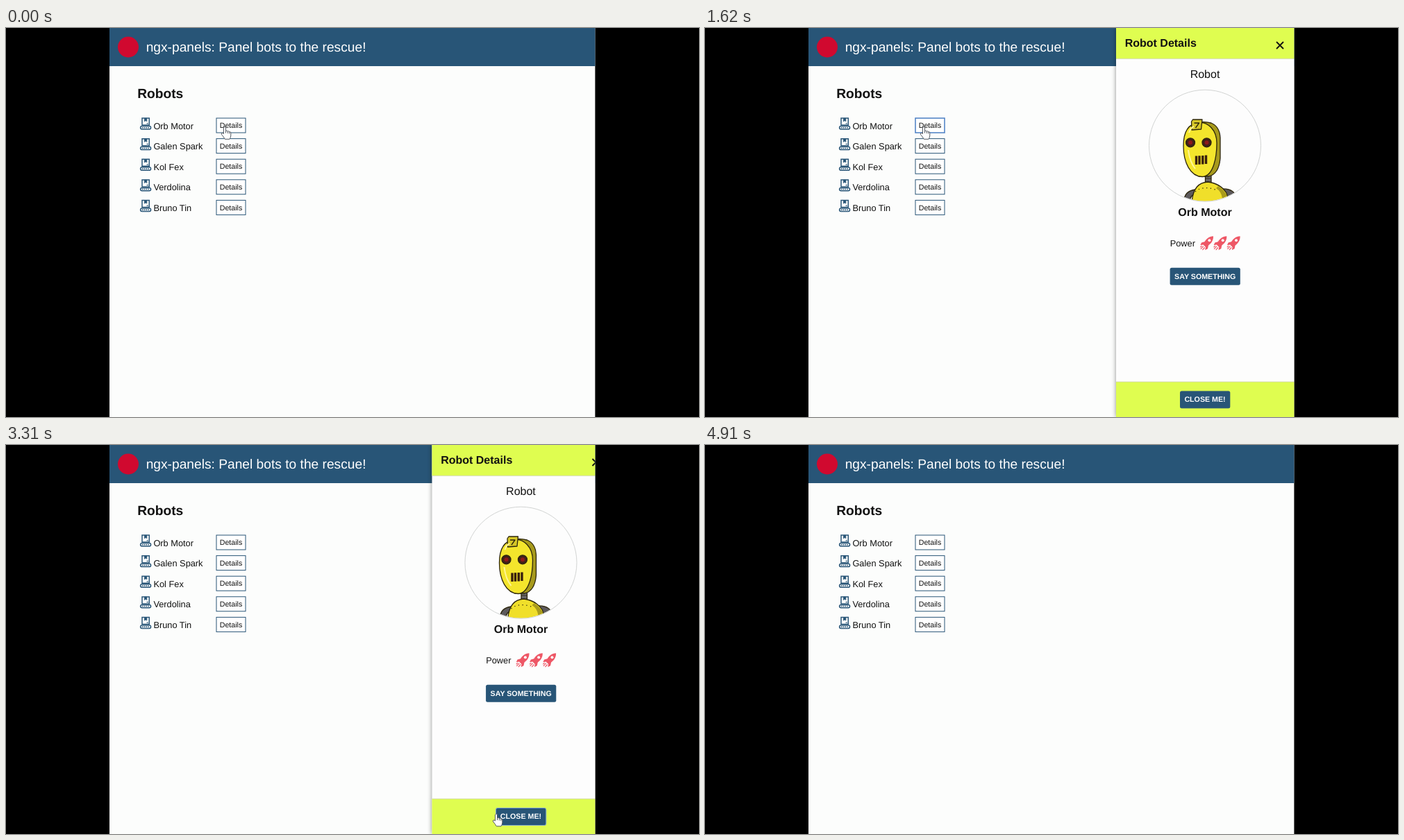
Recreate the animation shown at these times as an HTML page. Size 998 by 561 pixels, loop 4.98 s.

```html
<!DOCTYPE html>
<html lang="en">
<head>
<meta charset="utf-8">
<title>Robot panels</title>
<style>
  html, body { margin: 0; height: 100%; overflow: hidden; background: #000; }
  svg { display: block; width: 998px; height: 561px; }
  text { font-family: "Liberation Sans", Arial, sans-serif; fill: #111; text-rendering: geometricPrecision; }
  .bold { font-weight: bold; }
  #panel { filter: drop-shadow(0 0 3px rgba(0, 0, 0, .45)); }
</style>
</head>
<body>
<svg viewBox="0 0 998 561">
  <defs>
    <clipPath id="page"><rect x="149" width="699.4" height="561"/></clipPath>
    <clipPath id="round"><circle cx="720" cy="169.7" r="80"/></clipPath>
    <g id="icon" fill="none" stroke="#285577" stroke-width="1.5">
      <path d="M3.2.8H13.5V10.8H3.2Z"/>
      <path d="M6.7 1V5.4L8.4 4.2 10 5.4V1Z" fill="#285577" stroke-width=".8"/>
      <path d="M9.8 8.5H12" stroke-width="1.2"/>
      <rect x=".8" y="12.3" width="15" height="4.4" rx="2.2"/>
      <path d="M3 14.5H14" stroke-dasharray="1.6 1.2"/>
    </g>
    <g id="rocket" fill="#ee5766">
      <path d="M19 0C13 0 9 4 6.5 8L2 9.2.3 13 4.6 12.2 8 15.6 7.2 20 11 18 12 13.2C16 10.5 19.3 6 19 0Z"/>
      <circle cx="13.4" cy="6" r="2" fill="#fdfdfd"/>
      <path d="M4.8 14.4.8 18.6M6.6 16.2 3.4 19.8M2.6 13.8.3 16" stroke="#ee5766" stroke-width="1.2"/>
    </g>
  </defs>
  <g clip-path="url(#page)">
    <rect x="149" width="700" height="561" fill="#fcfdfc"/>
    <rect x="149" width="700" height="55" fill="#285577"/>
    <circle cx="176" cy="27.5" r="15" fill="#d0092f"/>
    <text x="201.7" y="33.6" font-size="19.2" style="fill:#fff">ngx-panels: Panel bots to the rescue!</text>
    <text class="bold" x="189.2" y="101" font-size="19.2">Robots</text>
    <g id="list"></g>

    <g id="panel">
      <rect x="592" width="260" height="561" fill="#fdfdfd"/>
      <path d="M592 0H852V44H592ZM592 510H852V561H592Z" fill="#dffd50"/>
      <path d="M592 44.3H852M592 510.3H852" stroke="#d5dca8"/>
      <text class="bold" x="604.7" y="27.2" font-size="16">Robot Details</text>
      <path d="M823 20 833 30M833 20 823 30" stroke="#111" stroke-width="1.8"/>
      <text x="720" y="72" font-size="16" text-anchor="middle">Robot</text>
      <g id="avatar" clip-path="url(#round)" stroke="#2d260d" stroke-width="1.3" stroke-linejoin="round">
        <path d="M690 250Q690 235 706 233L708 239Q699 240 698 250ZM766 248Q764 231 744 232L742 238Q753 240 757 250Z" fill="#5d5a5c"/>
        <path d="M720.5 210H729V228H720.5Z" fill="#69666a"/>
        <path d="M720.5 217H729M720.5 222H729" stroke-width=".9"/>
        <path d="M701 252Q703 223 724 222 742 224 751 238L755 252Z" fill="#f0df2a"/>
        <path d="M739 228Q747 233 752 242L745 246Q744 236 736 231Z" fill="#a99b1d" stroke="none"/>
        <path d="M706 236Q716 227 735 233" fill="none" stroke-dasharray="1.3 4.5"/>
        <path d="M707 137Q717 134 729 137 741 142 742 158L742 188Q740 211 725 214L711 214Z" fill="#a79a1c"/>
        <path d="M711 136.500C724 135 737 147 737 166 737 184 733 214 716 214.500 699 214 689 194 689 170 689 150 696 138 711 136.500Z" fill="#f4e52c"/>
        <path d="M700.500 135 702.500 132H716L714.500 146 701 147Z" fill="#d6c728"/>
        <path d="M704.500 137H711.500L706.500 144" fill="none"/>
        <path d="M696 176Q698 193 706 203M697 151Q699 144 704 142" fill="none" stroke="#fff69a" stroke-width="2"/>
        <g fill="#402018">
          <circle cx="699" cy="165.300" r="6.500"/><circle cx="722.500" cy="165.300" r="6.500"/>
        </g>
        <g fill="#8e1919" stroke="none">
          <circle cx="699" cy="165.300" r="3"/><circle cx="722.500" cy="165.300" r="3"/>
        </g>
        <path d="M707.500 184.500V197M712 184.300V196.800M716.800 184V196.500M721.500 183.500V196" stroke="#39200e" stroke-width="3.400"/>
      </g>
      <circle cx="720" cy="169.700" r="80.500" fill="none" stroke="#d2d4d3"/>
      <text id="name" class="bold" x="720" y="271.200" font-size="16" text-anchor="middle"></text>
      <text x="669.700" y="314.800" font-size="12.800">Power</text>
      <use href="#rocket" x="713" y="300.300"/>
      <use href="#rocket" x="732.300" y="300.300"/>
      <use href="#rocket" x="751.600" y="300.300"/>
      <g font-size="10.670" text-anchor="middle">
        <rect x="669.600" y="345.800" width="101.200" height="25" rx="2.500" fill="#285577"/>
        <text class="bold" x="720.200" y="361.600" style="fill:#fff">SAY SOMETHING</text>
        <rect id="close" x="684" y="523.500" width="72.300" height="25" rx="2.500" fill="#285577"/>
        <text class="bold" x="720" y="539.400" style="fill:#fff">CLOSE ME!</text>
      </g>
    </g>

    <g id="cursor" fill="#fff" stroke="#555a62" stroke-linejoin="round">
      <path id="hand" d="M-1.500 10.500V1.500Q0-.8 1.500 1.500V6.500Q3.200 5.200 4.300 7 6 6 6.800 7.800 8.800 7.300 8.800 9.500V13Q8.600 16 7 18.300H.3Q-1.500 15-4.600 11.500-5.300 9.300-3 9.400ZM1.500 6.500V9.500M4.300 7V10M6.800 7.800V10.500"/>
      <path id="arrow" d="M0 0V12.300L2.800 9.700 4.900 14.400 6.900 13.500 4.900 8.900H8.700Z"/>
    </g>
  </g>
</svg>
<script>
const LOOP = 4980, AWAY = 257;
const $ = id => document.getElementById(id);
const names = ["Orb Motor", "Galen Spark", "Kol Fex", "Verdolina", "Bruno Tin"];

$("list").innerHTML = names.map((name, i) => {
  const y = 29.6 * i;
  return `<g transform="translate(0 ${y.toFixed(1)})">
    <use href="#icon" x="192.8" y="129.3"/>
    <text x="212.4" y="145.7" font-size="12.8">${name}</text>
    <rect class="details" x="303" y="130" width="42" height="21" fill="#fff" stroke="#285577"/>
    <text x="324" y="144.200" font-size="10.67" text-anchor="middle">Details</text></g>`;
}).join("");
$("name").textContent = names[0];
const details = document.querySelector(".details");

const clamp = v => Math.min(1, Math.max(0, v));

// CSS ease-in, cubic-bezier(.42, 0, 1, 1)
function easeIn(p) {
  let lo = 0, hi = 1;
  const y = s => 3 * (1 - s) * s * s + s ** 3;
  for (let i = 0; i < 20; i++) {
    const s = (lo + hi) / 2;
    if (1.26 * (1 - s) ** 2 * s + y(s) < p) lo = s; else hi = s;
  }
  return y(lo);
}

// The panel is redrawn only at these moments
const ticks = [0, 710, 750, 790, 820, 860, 930, 3270, 3300, 3340, 3370, 3410, 3440, 3470];

function panelShift(t) {
  const at = ticks.filter(k => k <= t).pop();
  return at < 2000
    ? AWAY * easeIn(1 - clamp((at - 707) / 200))
    : AWAY * easeIn(clamp((at - 3253) / 200));
}

// time, x, y of the pointer tip
const path = [[0, 315, 142], [1640, 315, 142], [2080, 702, 462], [2160, 702, 462],
  [2450, 706, 531.500], [3830, 706, 531.500], [4340, 860, 360], [LOOP, 860, 360]];

function pointer(t) {
  const i = path.findIndex(k => k[0] > t);
  const [t0, x0, y0] = path[i - 1], [t1, x1, y1] = path[i];
  const p = (t - t0) / (t1 - t0), e = p * p * (3 - 2 * p);
  return [x0 + (x1 - x0) * e, y0 + (y1 - y0) * e];
}

const show = (id, on) => $(id).style.display = on ? "" : "none";
const inBox = (x, y, l, t, r, b) => x > l && x < r && y > t && y < b;

function draw() {
  const t = performance.now() % LOOP;
  const shift = panelShift(t);
  show("panel", shift < AWAY - .5);
  $("panel").setAttribute("transform", `translate(${shift} 0)`);
  show("avatar", t >= 1540);

  const focused = t >= 460 && t < 3060;
  details.setAttribute("stroke", focused ? "#4a7fc4" : "#285577");
  details.setAttribute("stroke-width", focused ? 1.5 : 1);
  $("close").setAttribute("stroke", t >= 3060 ? "#7fa6cf" : "none");

  const [x, y] = pointer(t);
  const hand = inBox(x, y, 302, 129, 346, 152) || inBox(x, y, 684, 523, 757, 549);
  $("cursor").setAttribute("transform", `translate(${x} ${y})`);
  show("hand", hand);
  show("arrow", !hand);
  requestAnimationFrame(draw);
}
draw();
</script>
</body>
</html>
```
